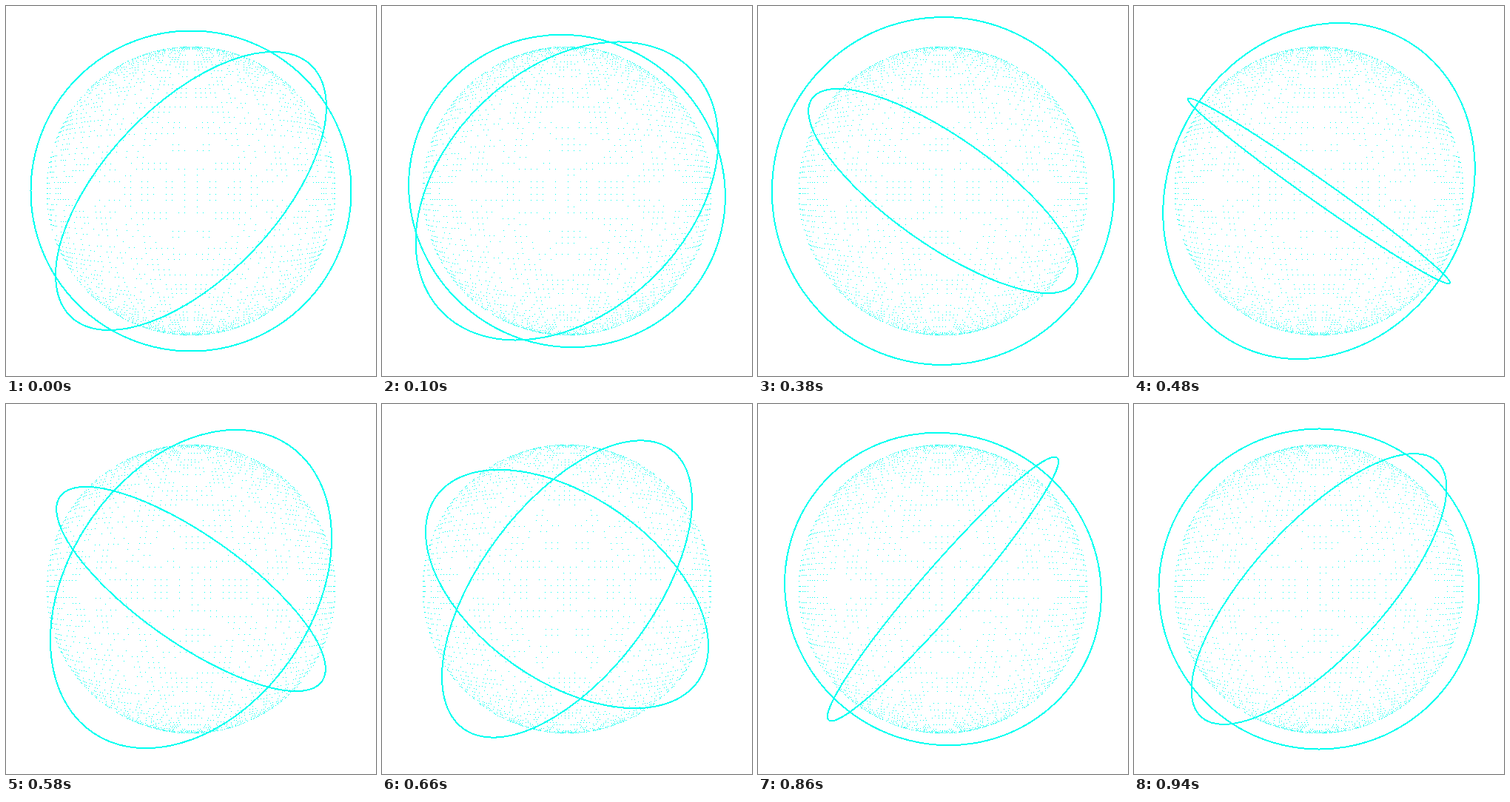
Animation of 500 by 500 pixels, one loop 0.96 s. Source, as an HTML page:

```html
<!DOCTYPE html>
<html lang="en">
<head>
<meta charset="utf-8">
<title>Dotted globe with two rings</title>
<style>
  html, body { margin: 0; width: 100%; height: 100%; overflow: hidden; background: #fff; }
  svg { display: block; width: 100vw; height: 100vh; }
  ellipse { fill: none; stroke: #00fff0; stroke-width: 2; shape-rendering: crispEdges; }
  path { fill: #00fff0; shape-rendering: crispEdges; }
</style>
</head>
<body>
<svg viewBox="0 0 500 500">
  <path id="dots"/>
  <ellipse id="inner" cx="250" cy="250"/>
  <ellipse id="outer" cx="250" cy="250"/>
</svg>
<script>
const LOOP = 960, TICK = 20, CENTER = 250;
const GLOBE = 190.4, EYE = 4.62;   // eye distance in globe radii
const GRID = 2, PHASES = 6, REACH = 0.35;
const RAD = Math.PI / 180;
const byId = id => document.getElementById(id);
const dots = byId('dots');

// Each ring's normal turns from u towards v.
const inner = { el: byId('inner'), r: 216.5, u: [0, 0, 1], v: [0.576, -0.817, 0], step: 180 / 23 };
const outer = { el: byId('outer'), r: 235, u: [0.628, 0.6, 0.496], v: [-0.444, -0.258, 0.859], step: 7.5 };

function drawRing({ el, r, u, v, step }, k) {
  const a = k * step * RAD;
  const [x, y, z] = u.map((c, i) => c * Math.cos(a) + v[i] * Math.sin(a));
  const turn = Math.atan2(y, x) / RAD + 90;
  el.setAttribute('rx', r);
  el.setAttribute('ry', r * Math.min(1, Math.abs(z)));
  el.setAttribute('transform', `rotate(${turn} ${CENTER} ${CENTER})`);
}

// A dot smaller than a pixel shows only when it covers the pixel's middle.
const covers = p => Math.abs(p - Math.floor(p) - 0.5) < REACH;

function globePath(phase) {
  const seen = new Set();
  for (let lat = -90 + GRID / 2; lat < 90; lat += GRID) {
    const up = Math.sin(lat * RAD), row = Math.cos(lat * RAD);
    for (let j = -45; j <= 45; j++) {
      const lon = (j - phase / PHASES) * GRID * RAD;
      const z = row * Math.cos(lon);
      if (z < 1 / EYE) continue;   // beyond the visible edge
      const scale = GLOBE * EYE / (EYE - z);
      const x = CENTER + scale * row * Math.sin(lon);
      const y = CENTER + scale * up;
      if (covers(x) && covers(y)) seen.add(`M${Math.floor(x)} ${Math.floor(y)}h1v1h-1z`);
    }
  }
  return [...seen].join('');
}

const globe = Array.from({ length: PHASES }, (_, i) => globePath(i));
let last = -1;

function draw(time) {
  const tick = Math.floor((time % LOOP) / TICK);
  if (tick === last) return;
  last = tick;
  const k = Math.floor(tick / 2);
  dots.setAttribute('d', globe[tick % PHASES]);
  drawRing(inner, k);
  drawRing(outer, k);
}

const start = performance.now();
function loop() {
  draw(performance.now() - start);
  requestAnimationFrame(loop);
}
loop();
</script>
</body>
</html>
```
